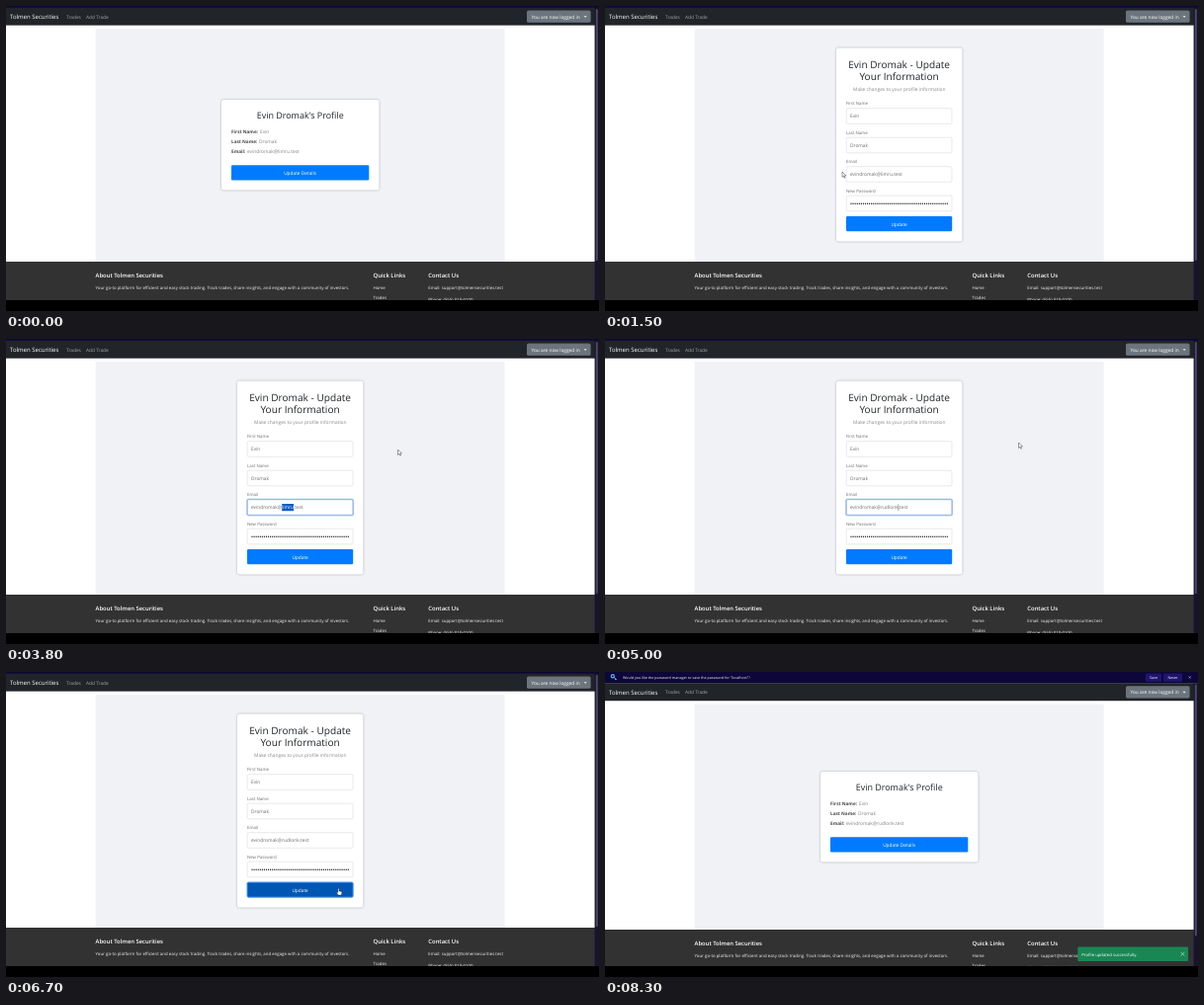
An HTML page that plays this animation: 600 by 309 pixels, repeating every 8800 ms.

```html
<!DOCTYPE html>
<html lang="en">
<head>
<meta charset="utf-8">
<title>Profile update</title>
<style>
  html, body { margin: 0; width: 100%; height: 100%; overflow: hidden; background: #000; }
  svg { display: block; width: 100%; height: 100%; }
  text { font-family: "Open Sans", "Noto Sans", sans-serif; text-rendering: geometricPrecision; white-space: pre; }
  .card { fill: #fff; filter: drop-shadow(0 .9px 1.3px rgba(0, 0, 0, .3)); }
</style>
</head>
<body>
<svg id="stage" viewBox="0 0 600 309"></svg>
<script>
const LOOP = 8800, STEP = 100, BAR_SHIFT = 9.6;
const BRAND = 'Tolmen Securities', FIRST = 'Evin', LAST = 'Dromak';
const USER = 'evindromak@', OLD_HOST = 'limru', NEW_HOST = 'rudlonk', TLD = '.test';
const BLUE = '#007bff', ACTIVE = '#0056b3';

const text = (x, y, str, size, fill, extra = '') =>
  `<text x="${x}" y="${y}" font-size="${size}" fill="${fill}" ${extra}>${str}</text>`;
const rect = (x, y, w, h, fill, extra = '') =>
  `<rect x="${x}" y="${y}" width="${w}" height="${h}" fill="${fill}" ${extra}/>`;
const centred = 'text-anchor="middle"';
const bold = 'font-weight="700"', semi = 'font-weight="600"';
const cross = (x, y, r, colour) =>
  `<path d="M${x - r} ${y - r}l${2 * r} ${2 * r}m0 ${-2 * r}l${-2 * r} ${2 * r}" stroke="${colour}" stroke-width=".6"/>`;

const field = (y, label, value = '') =>
  text(244, y - 3.1, label, 4.35, '#6a6a6a') +
  rect(244.2, y + .2, 106.8, 15.6, '#fff', 'rx="1.2" stroke="#d0d3d8" stroke-width=".5"') +
  text(248, y + 9.9, value, 4.85, '#6b6b6b');

const detail = (y, label, x, value) =>
  text(228, y, label, 4.7, '#4a4a4a', bold) + text(x, y, value, 4.85, '#808080');

const notice = `
  <g id="notice">
    <g stroke="#58b8ea" fill="none"><circle cx="7.8" cy="4.2" r="1.6" stroke-width="1.2"/>
      <path d="M9.1 5.4l2.8 2.6M10.9 7l-.9 1" stroke-width="1"/></g>
    ${text(18, 6.9, 'Would you like the password manager to save the password for "localhost"?', 3.66, '#f2f2f8')}
    ${rect(547, 1.4, 16, 8.3, '#201470', 'rx="1"')}${text(555, 6.9, 'Save', 3.7, '#fff', centred)}
    ${rect(565, 1.4, 19, 8.3, '#201470', 'rx="1"')}${text(574.5, 6.9, 'Never', 3.7, '#fff', centred)}
    ${cross(591.7, 5.4, 1, '#c8c8dc')}
  </g>`;

const nav = `
  <g id="nav">
    ${rect(0, 1.6, 596, 18, '#212529')}
    ${text(4, 13.2, BRAND, 6, '#fff')}
    ${text(61, 12.6, 'Trades', 4.8, '#a0a3a5')}
    ${text(81, 12.6, 'Add Trade', 4.8, '#a0a3a5')}
    ${rect(527, 4.6, 64.6, 12.2, '#6c757d', 'rx="1.6"')}
    ${text(531.5, 12.5, 'You are now logged in', 4.8, '#fff')}
    <path d="M584.6 10.2h3l-1.5 1.6z" fill="#fff"/>
  </g>`;

const profile = `
  <g id="profile">
    ${rect(218, 95, 159.5, 91.6, '#fff', 'rx="2.5" class="card"')}
    ${text(297.7, 113.7, `${FIRST} ${LAST}'s Profile`, 8.95, '#212529', centred)}
    ${detail(128.8, 'First Name:', 257, FIRST)}
    ${detail(139, 'Last Name:', 256, LAST)}
    ${detail(149.2, 'Email:', 244, '<tspan id="shownEmail"></tspan>')}
    ${rect(228, 161.3, 139.3, 15.2, BLUE, 'rx="1.3" id="openButton"')}
    ${text(297.6, 170.8, 'Update Details', 4.8, '#fff', centred)}
  </g>`;

const form = `
  <g id="form">
    ${rect(234, 42.4, 127.4, 196, '#fff', 'rx="2.5" class="card"')}
    ${text(297.6, 62.8, `${FIRST} ${LAST} - Update`, 10.1, '#212529', centred)}
    ${text(297.6, 74.9, 'Your Information', 10.1, '#212529', centred)}
    ${text(297.8, 85.6, 'Make changes to your profile information', 4.85, '#888', centred)}
    ${field(103.5, 'First Name', FIRST)}
    ${field(133, 'Last Name', LAST)}
    ${field(162.5, 'Email')}
    ${field(192, 'New Password')}
    <path d="M249 200.2H347.6" stroke="#222" stroke-width="1.35" stroke-linecap="round" stroke-dasharray="0 2.07"/>
    <g id="focus" fill="none">
      ${rect(243.7, 162.2, 107.8, 16.6, 'none', 'rx="1.6" stroke="#0d6efd" stroke-opacity=".28" stroke-width="1.3"')}
      ${rect(244.2, 162.7, 106.8, 15.6, 'none', 'rx="1.2" stroke="#6f9ff0" stroke-width=".6"')}
    </g>
    ${rect(0, 167, 0, 7.2, '#0b5cc8', 'id="selection"')}
    <text id="email" x="248" y="172.4" font-size="4.85" fill="#6b6b6b">${USER}<tspan id="host"></tspan>${TLD}</text>
    ${rect(0, 167.2, .4, 6.8, '#222', 'id="caret"')}
    ${rect(244, 213, 107.2, 15.2, BLUE, 'rx="1.3" id="saveButton"')}
    ${text(297.6, 222.5, 'Update', 4.8, '#fff', centred)}
  </g>`;

const footer = `
  <g id="footer">
    ${rect(0, 259, 596, 50, '#323232')}
    ${text(90.6, 275.3, 'About ' + BRAND, 5.85, '#fff', semi)}
    ${text(90.6, 287, 'Your go-to platform for efficient and easy stock trading. Track trades, share insights, and engage with a community of investors.', 4.35, '#f4f4f4')}
    ${text(371.5, 275.3, 'Quick Links', 5.9, '#fff', semi)}
    ${text(371.5, 287, 'Home', 4.35, '#f4f4f4')}
    ${text(371.5, 296.7, 'Trades', 4.35, '#f4f4f4')}
    ${text(427.3, 275.3, 'Contact Us', 5.9, '#fff', semi)}
    ${text(427.3, 287, 'Email: support@tolmensecurities.test', 4.35, '#f4f4f4')}
    ${text(427.3, 299.2, 'Phone: (555) 010-0100', 4.35, '#f4f4f4')}
  </g>`;

const toast = `
  <g id="toast">
    ${rect(478.3, 278.6, 111.8, 14.4, '#198754', 'rx="1"')}
    ${text(482.3, 287.5, 'Profile updated successfully.', 4.25, '#fff')}
    ${cross(584.5, 285.7, 1.8, '#d5eadf')}
  </g>`;

const cursors = `
  <g id="cursor" fill="#fff" stroke="#222" stroke-width=".45" stroke-linejoin="round">
    <path id="arrow" d="M0 0V5.4L1.3 4.2 2.2 6.2 3 5.8 2.2 3.9H3.9Z"/>
    <path id="hand" d="M-.6 0Q0-.6.6 0V2.4L2.9 3Q3.5 3.2 3.4 4L2.9 6.6H-.4L-2 4.2Q-2.2 3.3-1.4 3.4L-.6 4Z"/>
    <path id="beam" d="M-1 0H1M0 0V6M-1 6H1"/>
  </g>`;

document.getElementById('stage').innerHTML = `
  <clipPath id="screen"><rect width="600" height="298"/></clipPath>
  <g clip-path="url(#screen)">
    ${rect(0, 0, 600, 298, '#fff')}
    ${rect(0, 0, 600, 11.4, '#0d0638')}
    ${notice}
    <g id="body">${rect(0, 19.6, 596, 260, '#fff')}${rect(90.6, 23, 414, 250, '#f0f2f6')}</g>
    ${nav}${profile}${form}${footer}
    <g id="scroll">${rect(595.6, 1.6, 4.4, 297, '#17152d')}${rect(596.8, 3, 2, 255, '#4b4a66', 'rx="1"')}</g>
    ${toast}${cursors}
  </g>`;

const el = id => document.getElementById(id);
const show = (id, on) => el(id).setAttribute('visibility', on ? 'visible' : 'hidden');
const move = (id, x, y) => el(id).setAttribute('transform', `translate(${x} ${y})`);
const set = (id, attrs) => { for (const k in attrs) el(id).setAttribute(k, attrs[k]); };

// time, x, y, pointer shape
const path = [
  [900, 190, 196, 'arrow'], [1100, 250, 168, 'hand'], [1300, 249, 169, 'arrow'],
  [1500, 240, 168, 'arrow'], [1900, 240, 168, 'arrow'], [2300, 284, 168, 'beam'],
  [2700, 284, 168, 'arrow'], [3500, 396.5, 112, 'arrow'], [3900, 396.5, 112, 'arrow'],
  [4300, 418.5, 105, 'arrow'], [5400, 418.5, 105, 'arrow'], [6100, 336.5, 219.5, 'hand'],
  [6700, 336.5, 219.5, 'hand'], [6800, 318, 214, 'arrow'], [7100, 241, 189, 'arrow'],
  [7500, 150, 300, 'arrow']
];

function drawCursor(t) {
  const i = path.findLastIndex(p => p[0] <= t), visible = i >= 0 && i < path.length - 1;
  for (const kind of ['arrow', 'hand', 'beam']) show(kind, visible && path[i][3] === kind);
  if (!visible) return;
  const [t0, x0, y0] = path[i], [t1, x1, y1] = path[i + 1];
  const k = (t - t0) / (t1 - t0), e = k * k * (3 - 2 * k);
  move('cursor', x0 + (x1 - x0) * e, y0 + (y1 - y0) * e);
}

function drawForm(t) {
  const typed = Math.max(0, Math.min(NEW_HOST.length, Math.floor((t - 3900) / 100)));
  const selected = t >= 2600 && !typed, focused = t >= 2400 && t < 6300;
  el('host').textContent = typed ? NEW_HOST.slice(0, typed) : OLD_HOST;
  el('host').setAttribute('fill', selected ? '#fff' : '#6b6b6b');
  const measure = n => 248 + el('email').getSubStringLength(0, n);
  const start = measure(USER.length), end = measure(USER.length + el('host').textContent.length);
  set('selection', { x: start, width: end - start });
  set('caret', { x: end });
  show('selection', selected);
  show('focus', focused);
  show('caret', typed && focused && (t < 4700 || Math.floor((t - 4700) / 500) % 2 === 0));
  const pressed = t >= 6300;
  set('saveButton', {
    fill: pressed ? ACTIVE : t >= 6000 ? '#0069d9' : BLUE,
    stroke: pressed ? '#4d9bff' : 'none', 'stroke-width': 1
  });
}

function draw(t) {
  const editing = t >= 1300 && t < 6900, saved = t >= 6900;
  if (editing) drawForm(t);
  else for (const id of ['selection', 'focus', 'caret']) show(id, false);
  show('form', editing);
  show('profile', !editing);
  el('shownEmail').textContent = USER + (saved ? NEW_HOST : OLD_HOST) + TLD;
  set('openButton', { fill: t >= 1100 && t < 1300 ? ACTIVE : BLUE });

  const k = Math.max(0, Math.min(1, (t - 6900) / 300));
  const slide = 1 - (1 - k) ** 2;
  move('nav', 0, BAR_SHIFT * slide);
  move('body', 0, BAR_SHIFT * slide);
  move('scroll', 0, BAR_SHIFT * slide);
  move('profile', 0, 6 * slide);
  move('footer', 0, 2 * slide);
  show('notice', slide > 0);
  show('toast', saved);
  drawCursor(t);
}

let last = -1;
function tick() {
  const t = Math.floor((performance.now() % LOOP) / STEP) * STEP;
  if (t !== last) draw(last = t);
  requestAnimationFrame(tick);
}
tick();
</script>
</body>
</html>
```
